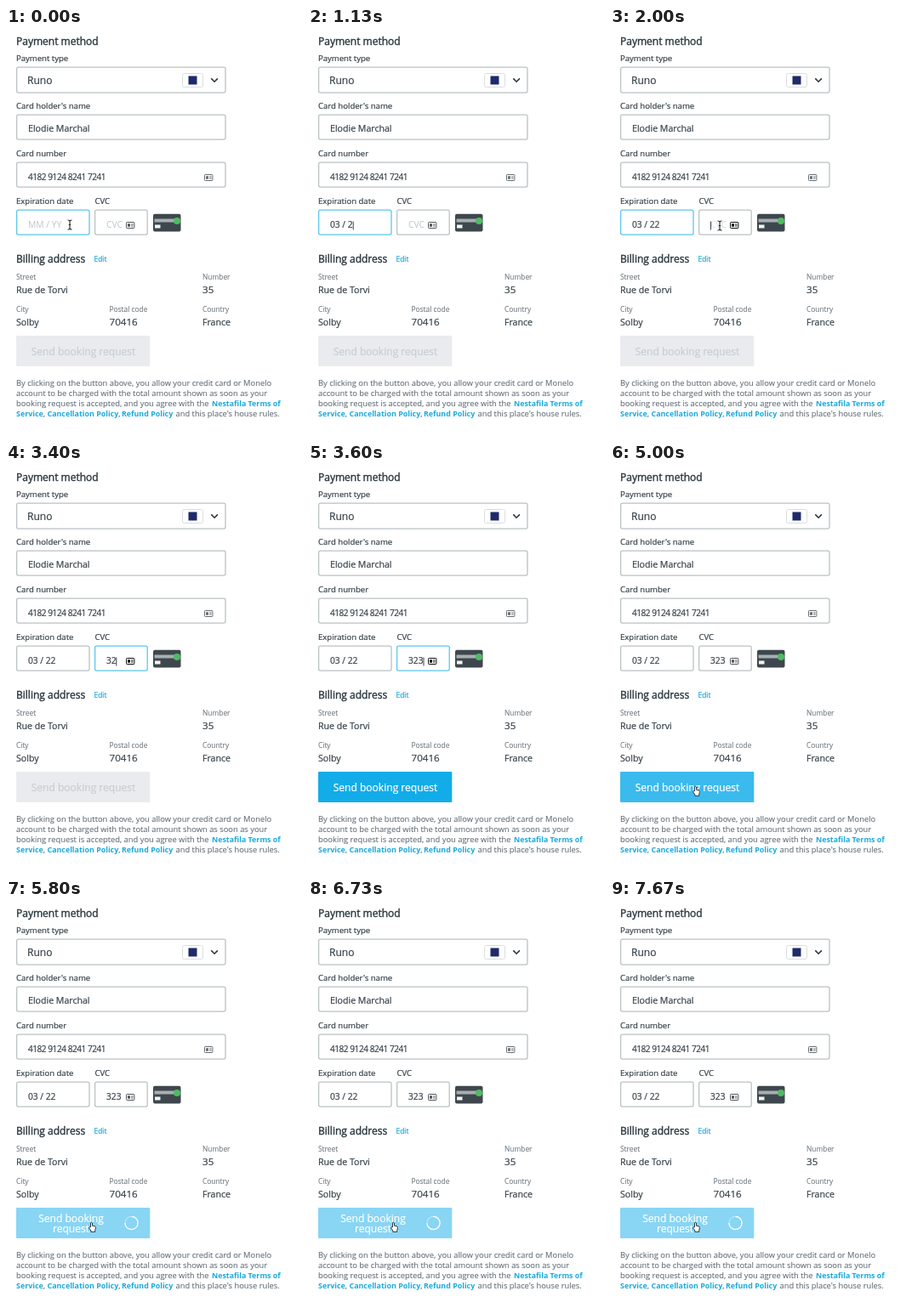
An HTML page for the animation above (7.74 s loop, 348x480 px).

```html
<!DOCTYPE html>
<html lang="en">
<head>
<meta charset="utf-8">
<title>Payment form</title>
<style>
html, body { margin: 0; width: 100%; height: 100%; overflow: hidden; background: #fff; }
svg { display: block; width: 348px; height: 480px; font-family: "Open Sans", "Noto Sans", sans-serif; color: #36434b; fill: currentColor; }
text { fill: currentColor; stroke: currentColor; stroke-width: .22; }
.head { font-size: 12px; color: #2b383f; stroke-width: .4; }
.label { font-size: 9.55px; }
.small { font-size: 8.4px; color: #6f7a82; }
.small text, .legal text { stroke-width: .1; }
.value { font-size: 10.6px; }
.num { font-size: 11.6px; }
.card { font-size: 10px; letter-spacing: -.43px; }
.input { font-size: 10.2px; }
.hint { font-size: 10.3px; color: #bfc5c8; stroke: none; }
.big { font-size: 12.05px; }
.edit { font-size: 8.4px; color: #1ba9dc; }
.legal { font-size: 9.35px; color: #626d76; }
.link { font-size: 8.9px; font-weight: 700; fill: #1ba9dc; stroke: none; }
.field rect { fill: #fff; stroke: #bac2c4; stroke-width: 1.3; }
</style>
</head>
<body>
<svg viewBox="0 0 348 480">
  <defs>
    <g id="idIcon">
      <rect x=".5" y=".5" width="9.4" height="7" rx=".8" fill="#fff" stroke="currentColor"/>
      <path d="M2 2.2h3v3.6H2zM6 2.4h2.6v1H6zM6 4.6h2.6v1H6z" fill="currentColor"/>
    </g>
    <path id="beamShape" d="M-2.5-5.5Q0-5.5 0-4Q0-5.5 2.5-5.5M0-4V4M-2.5 5.5Q0 5.5 0 4Q0 5.5 2.5 5.5M-1.2 0H1.2"/>
  </defs>

  <text class="head" x="12" y="20">Payment method</text>
  <g class="label">
    <text x="12" y="39">Payment type</text>
    <text x="12" y="95">Card holder's name</text>
    <text x="12" y="151">Card number</text>
    <text x="12" y="207">Expiration date</text>
    <text x="104.5" y="207">CVC</text>
  </g>

  <g class="field">
    <rect x="12.6" y="46.1" width="245.4" height="30" rx="2"/>
    <rect x="12.6" y="102.1" width="245.4" height="29" rx="2"/>
    <rect x="12.6" y="158.1" width="245.4" height="29" rx="2"/>
    <rect id="expBox" x="12.6" y="214.1" width="85.4" height="29" rx="2"/>
    <rect id="cvcBox" x="104.6" y="214.1" width="61.6" height="29" rx="2"/>
  </g>
  <text class="big" x="25" y="66">Runo</text>
  <rect x="207.5" y="53.5" width="24" height="16" rx="2" fill="#fff" stroke="#d9dde2"/>
  <rect x="214.5" y="56.5" width="10" height="10" fill="#1f2a6b"/>
  <path d="M241.3 59.4l3.8 3.8 3.8-3.8" fill="none" stroke="#2b383f" stroke-width="1.6"/>
  <text class="value" x="26" y="121.5">Elodie Marchal</text>
  <text class="card" x="26" y="179">4182 9124 8241 7241</text>
  <use href="#idIcon" x="233" y="172" color="#666e73"/>
  <use href="#idIcon" id="cvcIcon" x="141" y="228"/>

  <text id="expHint" class="hint" x="26" y="235">MM / YY</text>
  <text id="cvcHint" class="hint" x="118" y="235">CVC</text>
  <text id="exp" class="input" x="26" y="235"></text>
  <text id="cvc" class="input" x="118" y="235"></text>
  <rect id="caret" y="227.5" width="1" height="10"/>

  <rect x="173" y="218.7" width="32.5" height="20.8" rx="2" fill="#3e474d"/>
  <rect x="174.5" y="224.5" width="29" height="4" fill="#a7afb3"/>
  <rect x="175" y="231.5" width="6.5" height="4" fill="#f4f5f5"/>
  <circle cx="201" cy="227" r="4" fill="#4fbb63"/>

  <text class="head" x="12" y="276">Billing address</text>
  <text class="edit" x="103.5" y="275.3">Edit</text>
  <g class="small">
    <text x="12" y="296.3">Street</text>
    <text x="231" y="296.3">Number</text>
    <text x="12" y="334.3">City</text>
    <text x="121.5" y="334.3">Postal code</text>
    <text x="231" y="334.3">Country</text>
  </g>
  <g class="value">
    <text x="12" y="312">Rue de Torvi</text>
    <text class="num" x="231" y="312">35</text>
    <text x="12" y="350">Solby</text>
    <text class="num" x="121.5" y="350">70416</text>
    <text x="231" y="350">France</text>
  </g>

  <rect id="button" x="12" y="362" width="157.3" height="36" rx="1"/>
  <g id="caption" class="big" text-anchor="middle">
    <text id="oneLine" x="91" y="384.7">Send booking request</text>
    <g id="twoLines">
      <text x="76.5" y="378.7">Send booking</text>
      <text x="76.5" y="391.2">request</text>
    </g>
  </g>
  <g id="spinner" fill="none" stroke="#fff" stroke-width="1.2">
    <circle r="7.6" opacity=".4"/>
    <path d="M0-7.6A7.6 7.6 0 1 1-7.6 0"/>
  </g>

  <g class="legal">
    <text x="12" y="421">By clicking on the button above, you allow your credit card or Monelo</text>
    <text x="12" y="433">account to be charged with the total amount shown as soon as your</text>
    <text x="12" y="445">booking request is accepted, and you agree with the</text>
    <text class="link" x="242" y="445">Nestafila Terms of</text>
    <text y="457"><tspan class="link" x="12">Service</tspan>,
      <tspan class="link" x="48.5">Cancellation Policy</tspan>,
      <tspan class="link" x="136">Refund Policy</tspan>
      <tspan x="199.5">and this place's house rules.</tspan></text>
  </g>

  <g id="beam" fill="none">
    <use href="#beamShape" stroke="#fff" stroke-width="2.4"/>
    <use href="#beamShape" stroke="#222" stroke-width="1.1"/>
  </g>
  <path id="hand" d="M-2-5.2Q-1-6 0-5V-1.8L2.6-1.2Q4-.8 4 .6L3.2 3.6V5.4H-1.6V4L-4 .8Q-4.2-.8-2-.2Z" fill="#fff" stroke="#222" stroke-width=".9"/>
</svg>

<script>
const LOOP = 7740;
const $ = id => document.getElementById(id);
const show = (id, on) => $(id).style.display = on ? "" : "none";
const paint = (id, prop, value) => $(id).style[prop] = value;
const clamp = v => Math.max(0, Math.min(1, v));

// time, expiration text, CVC text, caret x
const typing = [
  [0, "", "", -9],
  [130, "0", "", 32.3],
  [400, "03 /", "", 46.7],
  [1070, "03 / 2", "", 52.7],
  [1270, "03 / 22", "", 58.5],
  [2000, "03 / 22", "", 118],
  [2800, "03 / 22", "3", 124],
  [3270, "03 / 22", "32", 129.3],
  [3600, "03 / 22", "323", 135.5]
];
// time, pointer x, y
const pointer = [
  [0, 75, 231.5], [1530, 75, 231.5], [1930, 129, 232.5], [4070, 129, 232.5],
  [4330, 115, 388], [4600, 109, 386.5], [4670, 101.5, 385]
];

function pointerAt(t) {
  const i = pointer.findLastIndex(p => p[0] <= t);
  const [t0, x0, y0] = pointer[i];
  const [t1, x1, y1] = pointer[i + 1] || [LOOP, x0, y0];
  const k = clamp((t - t0) / (t1 - t0)), e = k * k * (3 - 2 * k);
  return [x0 + (x1 - x0) * e, y0 + (y1 - y0) * e];
}

function draw(t) {
  const [since, exp, cvc, caretX] = typing.findLast(s => s[0] <= t);
  $("exp").textContent = exp;
  $("cvc").textContent = cvc;
  show("expHint", !exp);
  show("cvcHint", !cvc);
  paint("cvcHint", "opacity", t < 1930 ? 1 : .6);
  $("caret").setAttribute("x", caretX);
  show("caret", t < 4530 && (t - since) % 1060 < 530);

  const focus = on => on ? "#5cc6ec" : "";
  paint("expBox", "stroke", focus(t < 2070));
  paint("cvcBox", "stroke", focus(t >= 2070 && t < 4530));
  paint("cvcIcon", "color", t >= 1930 && t < 4070 ? "#111" : "#50585d");

  const ready = t >= 3600, busy = t >= 5130;
  paint("button", "fill", ready ? "#12ace9" : "#e9ebee");
  paint("button", "fillOpacity", 1 - .5 * clamp((t - 4930) / 200));
  paint("caption", "color", ready ? "#fff" : "#c8cdd5");
  show("oneLine", !busy);
  show("twoLines", busy);
  show("spinner", busy);
  $("spinner").setAttribute("transform", `translate(147.5 380) rotate(${(t - 5800) / 935 * 360})`);

  const [x, y] = pointerAt(t);
  const typingNow = t >= 130 && t < 1530 || t >= 2800 && t < 4070;
  for (const id of ["beam", "hand"]) $(id).setAttribute("transform", `translate(${x} ${y})`);
  show("beam", !typingNow && y < 244);
  show("hand", y > 362);
}

function tick() {
  draw(performance.now() % LOOP);
  requestAnimationFrame(tick);
}
tick();
</script>
</body>
</html>
```
